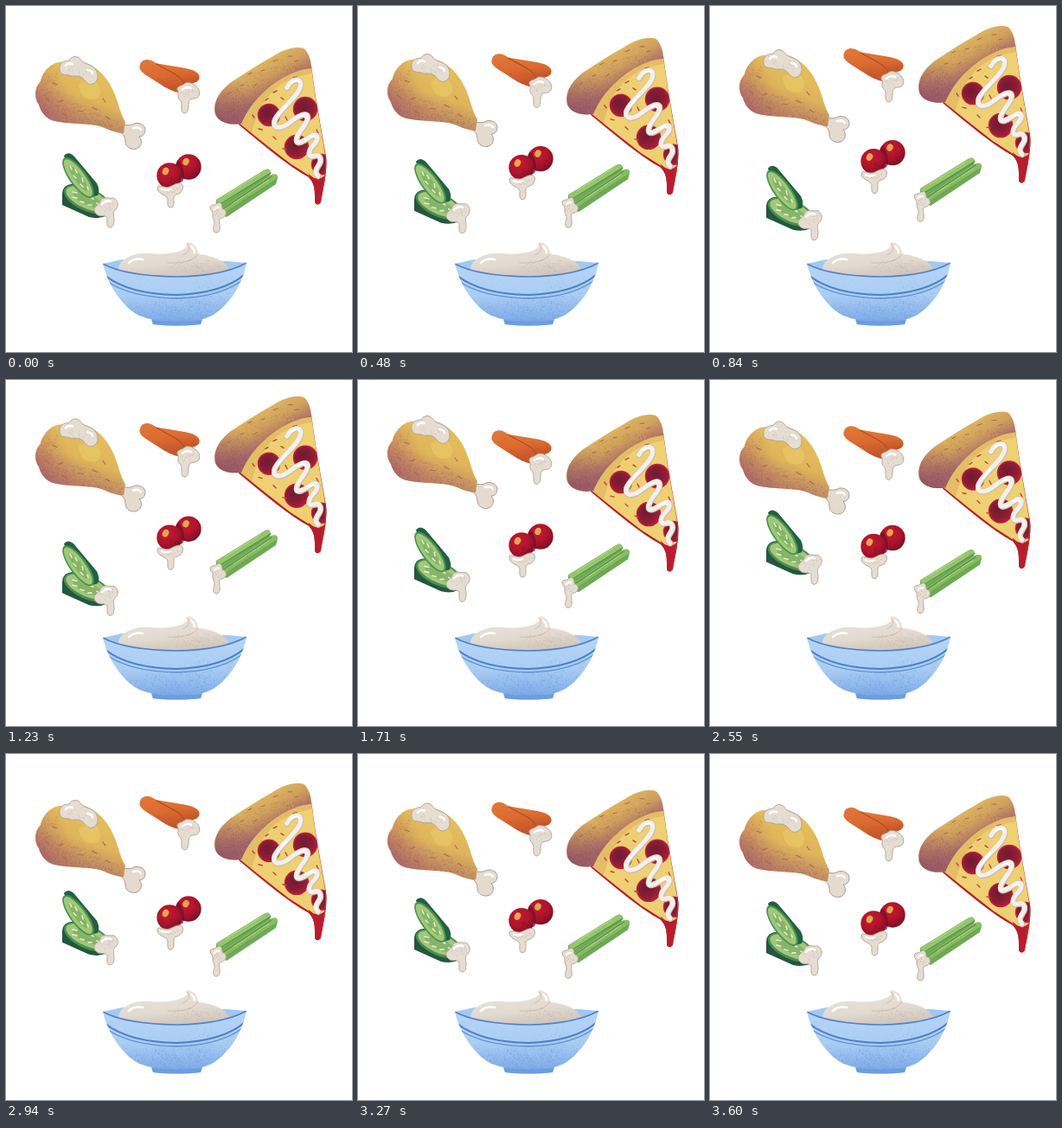
Animation, 400 px wide and 400 px high, one loop 3630 ms. Source, as an HTML page:

```html
<!DOCTYPE html>
<html lang="en">
<head>
<meta charset="utf-8">
<title>Snacks and dip</title>
<style>
html, body { margin: 0; width: 100%; height: 100%; overflow: hidden; background: #fff; }
svg { display: block; width: 100vw; height: 100vh; }
.dip { fill: #e5dcd2; stroke: #b0a297; stroke-width: .9; stroke-linejoin: round; }
.shine { fill: none; stroke: #fff; stroke-width: 2.6; stroke-linecap: round; }
.line { fill: none; stroke-linecap: round; stroke-linejoin: round; }
</style>
</head>
<body>
<svg viewBox="0 0 400 400">
<defs>
  <linearGradient id="meat" x1=".66" y1=".12" x2=".3" y2="1">
    <stop offset="0" stop-color="#e6c05c"/><stop offset=".45" stop-color="#dfb45a"/>
    <stop offset=".72" stop-color="#c08a63"/><stop offset="1" stop-color="#a0606a"/>
  </linearGradient>
  <linearGradient id="meatLeft" x1="0" y1=".6" x2=".4" y2=".4">
    <stop offset="0" stop-color="#a9626a" stop-opacity=".9"/><stop offset="1" stop-color="#c98a5c" stop-opacity="0"/>
  </linearGradient>
  <linearGradient id="crust" gradientUnits="userSpaceOnUse" x1="287" y1="67" x2="307" y2="101">
    <stop offset="0" stop-color="#dfb75f"/><stop offset=".5" stop-color="#cf9f5c"/><stop offset="1" stop-color="#a8696a"/>
  </linearGradient>
  <linearGradient id="crustEnd" gradientUnits="userSpaceOnUse" x1="250" y1="137" x2="284" y2="94">
    <stop offset="0" stop-color="#935365" stop-opacity=".95"/><stop offset="1" stop-color="#a8696a" stop-opacity="0"/>
  </linearGradient>
  <linearGradient id="bowl" x1="0" y1="0" x2="0" y2="1">
    <stop offset="0" stop-color="#b6d5f5"/><stop offset=".5" stop-color="#aacdf3"/>
    <stop offset=".78" stop-color="#8fb8ec"/><stop offset="1" stop-color="#76a4e2"/>
  </linearGradient>
  <linearGradient id="cream" x1=".3" y1="0" x2=".6" y2="1">
    <stop offset="0" stop-color="#ebe4db"/><stop offset=".6" stop-color="#e2d9cf"/><stop offset="1" stop-color="#cdc2b8"/>
  </linearGradient>
  <linearGradient id="carrot" x1="0" y1="0" x2=".2" y2="1">
    <stop offset="0" stop-color="#e17a38"/><stop offset=".55" stop-color="#db6a30"/><stop offset="1" stop-color="#c4562b"/>
  </linearGradient>
  <radialGradient id="berry" cx=".4" cy=".35" r=".68">
    <stop offset="0" stop-color="#c41a30"/><stop offset=".6" stop-color="#ae142b"/><stop offset="1" stop-color="#7a1029"/>
  </radialGradient>
  <radialGradient id="salami" cx=".42" cy=".42" r=".6">
    <stop offset="0" stop-color="#6f1a33"/><stop offset=".6" stop-color="#8a1c35"/><stop offset="1" stop-color="#a91f35"/>
  </radialGradient>
  <clipPath id="meatClip"><path d="M62 65C51 66 42 77 40 87C33 94 32 106 38 114C41 126 50 133 62 134C80 137 100 135 114 141C123 145 131 147 136 147L138 134C132 125 130 110 123 96C116 80 100 65 82 63Z"/></clipPath>
  <clipPath id="carrotClip">
    <path id="carrotBack" d="M172 66L208 72C219 74 226 79 223 85C219 91 208 91 200 89L178 78Z"/>
    <path id="carrotFront" d="M155 68C156 62 164 60 170 64L196 79C205 85 210 92 206 98C202 103 192 98 184 94L162 80C156 76 153 72 155 68Z"/>
  </clipPath>
  <clipPath id="crustClip"><path id="crustShape" d="M242 125C239 111 246 100 259 89C275 78 291 68 309 58C321 50 335 46 344 49C350 53 353 64 353 72C339 73 323 80 308 91C291 104 279 119 272 136C259 138 246 135 242 125Z"/></clipPath>
  <clipPath id="cheeseClip"><path id="cheeseShape" d="M269 137C278 117 291 102 308 90C323 79 339 72 353 69L358 105L365 146L370 174C372 192 366 213 364 227Q360 232 357 227C357 216 358 206 350 198C326 185 299 162 269 137Z"/></clipPath>
  <clipPath id="bowlClip"><path id="bowlShape" d="M112 298C128 308 161 313 198 313C232 312 262 305 278 297C275 314 266 333 252 347C243 356 235 360 227 362L225 368Q197 371 170 368L168 362C157 360 148 356 139 347C125 333 116 315 112 298Z"/></clipPath>
</defs>

<g id="bowlArt">
  <path d="M112 298L134 293L256 295L278 297Q262 312 198 315Q130 312 112 298Z" fill="#a3c9f1"/>
  <path d="M130 305C130 295 139 290 150 287C162 284 174 288 188 286C201 284 212 281 209 273C217 273 222 280 222 287C238 288 253 294 258 304Q235 314 196 314Q150 312 130 305Z" fill="url(#cream)"/>
  <path class="line" d="M222 287C217 295 203 298 187 297M209 275Q217 281 205 288" stroke="#c8bcb2"/>
  <path class="shine" d="M142 297Q148 291 158 293M214 278Q218 281 218 285"/>
  <path data-grain="218 301 30 8 130" stroke="#b2a398"/>
  <use href="#bowlShape" fill="url(#bowl)"/>
  <g clip-path="url(#bowlClip)">
    <path data-grain="195 352 57 17 460" stroke="#5b8cd6"/>
    <path data-grain="237 337 32 22 190" stroke="#6a9ade"/>
    <path data-grain="162 323 42 14 90" stroke="#d8ebfd"/>
    <path class="line" d="M115 312Q142 333 197 334Q250 332 275 311" stroke="#4a7fca" stroke-width="2"/>
    <path class="line" d="M118 319Q145 337 197 338Q245 337 272 318" stroke="#5a8dd3" stroke-width="1.3"/>
    <path d="M168 363Q197 366 227 363L225 371H170Z" fill="#6e9ce0"/>
  </g>
  <path class="line" d="M113 298.500Q138 312 198 313Q250 312 277 297.500" stroke="#4f83c8" stroke-width="1.700"/>
</g>

<g id="chicken">
  <path d="M131 136C138 138 143 138 146 137C152 133 161 137 161 143C161 149 157 151 154 151C158 155 157 163 151 165C145 167 138 163 138 157C138 151 135 147 131 146Z" fill="#e4dacf" stroke="#a1938b" stroke-width=".9"/>
  <path class="shine" d="M147 141Q153 139 156 143" stroke-width="2"/>
  <g clip-path="url(#meatClip)">
    <rect x="30" y="55" width="112" height="95" fill="url(#meat)"/>
    <rect x="30" y="55" width="112" height="95" fill="url(#meatLeft)"/>
    <path d="M84 91Q98 80 107 91Q113 103 103 108Q86 109 84 91" fill="#eccb68" opacity=".6"/>
    <path data-grain="66 126 44 18 380" stroke="#8f5060"/>
    <path data-grain="48 101 17 30 230" stroke="#9b5a63"/>
    <path data-grain="111 137 25 10 120" stroke="#8f5060"/>
    <path data-grain="94 101 26 21 100" stroke="#f0d47d"/>
    <path class="line" d="M54 89l5 2M45 106l5 3M61 111l5-2M84 121l5 1M100 117l5 3M112 107l3 4M116 128l4 3M66 125l5 2" stroke="#a9694f" stroke-width="1.1"/>
  </g>
  <path class="dip" d="M62 73C61 66 67 63 73 63C76 57 84 57 87 63C91 68 100 67 104 74C108 80 106 89 100 90C94 92 92 86 88 83C83 79 79 83 73 80C68 79 62 80 62 73Z"/>
  <path class="shine" d="M69 69Q72 65 77 67M94 74Q99 74 100 78"/>
  <path data-grain="85 76 17 6 30" stroke="#a99685"/>
</g>

<g id="carrots">
  <use href="#carrotBack" fill="url(#carrot)"/>
  <use href="#carrotFront" fill="url(#carrot)"/>
  <g clip-path="url(#carrotClip)">
    <path class="line" d="M174 67L196 79Q205 85 207 92" stroke="#b04d26" stroke-width="1.2"/>
    <path data-grain="183 91 22 7 60" stroke="#ae471f"/>
  </g>
  <path class="dip" d="M198 97C197 92 203 93 206 90C211 86 219 91 222 95C226 101 223 107 217 107C212 107 211 111 211 115C211 120 210 124 206 124C202 123 203 117 203 113C202 108 198 108 199 103Q200 100 198 97Z"/>
  <path class="shine" d="M204 97Q209 92 214 95" stroke-width="2"/>
  <path data-grain="211 100 9 6 24" stroke="#a99685"/>
</g>

<g id="pizza">
  <use href="#cheeseShape" fill="#efd072"/>
  <g clip-path="url(#cheeseClip)">
    <path d="M269 139Q285 99 315 82L353 70L355 78Q325 82 308 99Q292 114 283 150Z" fill="#dcab5c" opacity=".5"/>
    <path data-grain="306 105 35 34 190" stroke="#d3a052"/>
    <path data-grain="351 151 17 49 90" stroke="#dca557"/>
    <g fill="url(#salami)" stroke="#b92338" stroke-width="1.5">
      <circle cx="304" cy="126" r="12.5"/><circle cx="346" cy="119" r="13.5"/>
      <circle cx="336" cy="163" r="13.5"/><circle cx="365" cy="183" r="11.5"/>
    </g>
    <path class="line" d="M285 126l2 3M292 142l4 1M309 151l3 3M318 106l3 2M309 100l4-2M323 128l2 4M332 83l4-1M359 143l2 4M320 165l4 1M303 107l-3 2" stroke="#b9453c" stroke-width="1.4"/>
    <path class="line" d="M268 138Q300 164 326 184L348 198Q357 207 358 230" stroke="#b81d2f" stroke-width="6"/>
    <path d="M350 194Q360 205 371 194L365 232H355Z" fill="#b81d2f"/>
    <path class="line" d="M354 70L359 107L370 172Q371 196 364 228" stroke="#c5393a" stroke-width="2"/>
  </g>
  <use href="#crustShape" fill="url(#crust)"/>
  <g clip-path="url(#crustClip)">
    <rect x="238" y="85" width="60" height="57" fill="url(#crustEnd)"/>
    <path data-grain="263 120 22 23 330" stroke="#844858"/>
    <path data-grain="292 94 27 18 170" stroke="#995c60"/>
    <path data-grain="329 75 25 9 120" stroke="#995c60"/>
    <path data-grain="301 68 38 13 100" stroke="#ecca78"/>
    <path class="line" d="M256 102l4-2M271 92l4-1M280 79l4-2M295 75l4-1M309 64l5-2M326 58l5 0M287 92l3-2M334 64l4-1" stroke="#a86f53" stroke-width="1.1"/>
  </g>
  <g class="line">
    <path id="swirl" d="M325 95C331 84 342 83 341 92C340 104 318 118 311 132C307 144 319 143 330 134C339 127 349 122 349 130C348 139 336 147 336 155C336 163 348 154 355 150C362 148 362 155 356 161C350 167 348 176 356 174C363 171 366 178 362 184C358 190 357 193 361 197" stroke="#cabdaf" stroke-width="6.500"/>
    <use href="#swirl" y="-.5" style="stroke-width:5"/>
    <path d="M325 95C331 84 342 83 341 92C340 104 318 118 311 132C307 144 319 143 330 134C339 127 349 122 349 130C348 139 336 147 336 155C336 163 348 154 355 150C362 148 362 155 356 161C350 167 348 176 356 174C363 171 366 178 362 184C358 190 357 193 361 197" transform="translate(-.3 -.6)" stroke="#f4efe8" stroke-width="5.200"/>
    <path d="M330 89Q335 84 339 88M315 126L324 115M339 128Q345 125 346 129M350 152Q356 149 357 152" stroke="#fff" stroke-width="2"/>
  </g>
</g>

<g id="cucumber">
  <path d="M65 218C65 209 71 205 81 206L116 224Q127 235 117 242Q108 247 96 244L65 230Z" fill="#24573e"/>
  <ellipse cx="94" cy="223.500" rx="29" ry="13.500" transform="rotate(24 94 223.500)" fill="#4a8f50"/>
  <ellipse cx="94" cy="223" rx="26.500" ry="11" transform="rotate(24 94 223)" fill="#a2c77c"/>
  <ellipse cx="94" cy="223.500" rx="18" ry="6.500" transform="rotate(24 94 223.500)" fill="#86b468"/>
  <path class="line" d="M77 215l5 1M77 221l5 1M88 215l4 2M86 226l4 1M97 221l4 2M95 230l4 0M105 228l3 2" stroke="#e6edc6" stroke-width="1.700"/>
  <path d="M67 173Q72 167 79 174L105 205Q109 213 106 219L98 221Q76 206 67 173Z" fill="#23603f"/>
  <ellipse cx="83.500" cy="198.500" rx="28" ry="10" transform="rotate(54 83.500 198.500)" fill="#4a9150"/>
  <ellipse cx="83.300" cy="198.700" rx="25.800" ry="8" transform="rotate(54 83.300 198.700)" fill="#9fc87a"/>
  <ellipse cx="83.500" cy="199" rx="18" ry="4.500" transform="rotate(54 83.500 199)" fill="#84b567"/>
  <path class="line" d="M74 185l2 4M80 189l2 4M78 196l3 3M88 199l1 4M86 206l3 3M94 209l1 3" stroke="#e6edc6" stroke-width="1.600"/>
  <path class="dip" d="M103 239C99 232 107 231 109 226C111 219 119 223 124 222C130 224 131 232 126 236C123 239 125 243 125 247C125 252 124 256 120 256C116 256 117 249 117 245C114 240 108 246 103 239Z"/>
  <path class="shine" d="M111 229Q115 224 121 226" stroke-width="2"/>
  <path data-grain="116 232 9 7 28" stroke="#a99685"/>
</g>

<g id="tomatoes">
  <circle cx="211" cy="186" r="14.700" fill="url(#berry)"/>
  <path data-grain="215 193 8 6 50" stroke="#6b0f28"/>
  <path d="M199 178Q191 187 198 203Q206 206 206 196Q206 185 199 178" fill="#6b0f28" opacity=".7"/>
  <circle cx="189" cy="196" r="14.700" fill="url(#berry)"/>
  <path data-grain="194 202 7 6 50" stroke="#6b0f28"/>
  <ellipse cx="184.500" cy="191" rx="3.600" ry="4.500" fill="#e3a552" transform="rotate(25 184.500 191)"/>
  <ellipse cx="208" cy="180" rx="3.600" ry="4.300" fill="#e3a552" transform="rotate(25 208 180)"/>
  <path class="dip" d="M175 209C178 206 184 211 189 209C194 207 201 202 204 207C206 212 202 217 197 218C193 219 194 223 194 227C194 231 193 233 190 233C186 233 187 227 187 223C185 217 174 218 175 209Z"/>
  <path class="shine" d="M180 212Q185 214 190 212" stroke-width="1.900"/>
  <path data-grain="190 213 10 4 22" stroke="#a99685"/>
</g>

<g id="celery">
  <path d="M243 224L298 190Q304 186 306 192L305 196Q314 192 314 199L312 206L255 244L243 238Z" fill="#6fa957"/>
  <path d="M243 224L298 190Q304 186 306 192L247 231Z" fill="#94c66c"/>
  <path d="M249 234L305 196Q314 192 314 199L253 239Z" fill="#8abd62"/>
  <path class="line" d="M246 230L306 193M250 235L307 197" stroke="#578f49" stroke-width="1.200"/>
  <path class="line" d="M253 239L312 201" stroke="#69a553" stroke-width=".9"/>
  <path class="line" d="M254 219L294 194M263 228L304 201" stroke="#b5d98c"/>
  <path data-grain="281 220 28 4 60" stroke="#568f4b" transform="rotate(-33 281 220)"/>
  <path class="dip" d="M236 233C236 229 241 231 244 228C249 225 250 231 250 234C257 237 255 243 250 245C245 245 247 250 247 254C248 259 246 262 243 262C239 262 239 257 241 252C242 247 238 246 239 241C240 237 236 237 236 233Z"/>
  <path class="shine" d="M241 235Q243 232 246 233" stroke-width="1.800"/>
  <path data-grain="245 239 5 6 22" stroke="#a99685"/>
</g>
</svg>
<script>
const LOOP = 3630, STEP = 30;

// Vertical offsets as [time, dy] rest points
const tracks = {
  chicken: [[0, 0], [1755, -17], [LOOP, 0]],
  carrots: [[0, 0], [970, -13.5], [2100, 0], [2860, -13.5], [LOOP, 0]],
  pizza: [[0, 0], [1150, -30], [1990, -.5], [2820, -15], [LOOP, 0]],
  cucumber: [[0, 0], [1110, 17], [2400, -20.5], [LOOP, 0]],
  tomatoes: [[0, 0], [880, -16.5], [2200, 0], [2900, -7], [LOOP, 0]],
  celery: [[0, 0], [1150, -15.5], [2230, 16], [2960, -5], [LOOP, 0]]
};

function offset(keys, t) {
  const i = keys.findIndex(k => k[0] > t);
  const [t0, a] = keys[i - 1], [t1, b] = keys[i];
  return a + (b - a) * (1 - Math.cos(Math.PI * (t - t0) / (t1 - t0))) / 2;
}

let seed = 41;
function rnd() {
  seed = (seed * 16807) % 2147483647;
  return seed / 2147483647;
}

// Fine speckles scattered in an ellipse
document.querySelectorAll('[data-grain]').forEach(el => {
  const [cx, cy, rx, ry, n] = el.dataset.grain.split(' ').map(Number);
  let d = '';
  for (let i = 0; i < n; i++) {
    const a = rnd() * 2 * Math.PI, r = Math.pow(rnd(), .65);
    d += `M${(cx + rx * r * Math.cos(a)).toFixed(1)} ${(cy + ry * r * Math.sin(a)).toFixed(1)}h.7`;
  }
  el.setAttribute('d', d);
  el.setAttribute('stroke-width', '.7');
  el.setAttribute('opacity', '.6');
});

const parts = Object.entries(tracks).map(([id, keys]) => [document.getElementById(id), keys]);

function draw(now) {
  const t = Math.floor((now % LOOP) / STEP) * STEP;
  for (const [el, keys] of parts) {
    el.setAttribute('transform', `translate(0 ${offset(keys, t).toFixed(2)})`);
  }
}

const start = performance.now();
function tick() {
  draw(performance.now() - start);
  requestAnimationFrame(tick);
}
tick();
</script>
</body>
</html>
```
